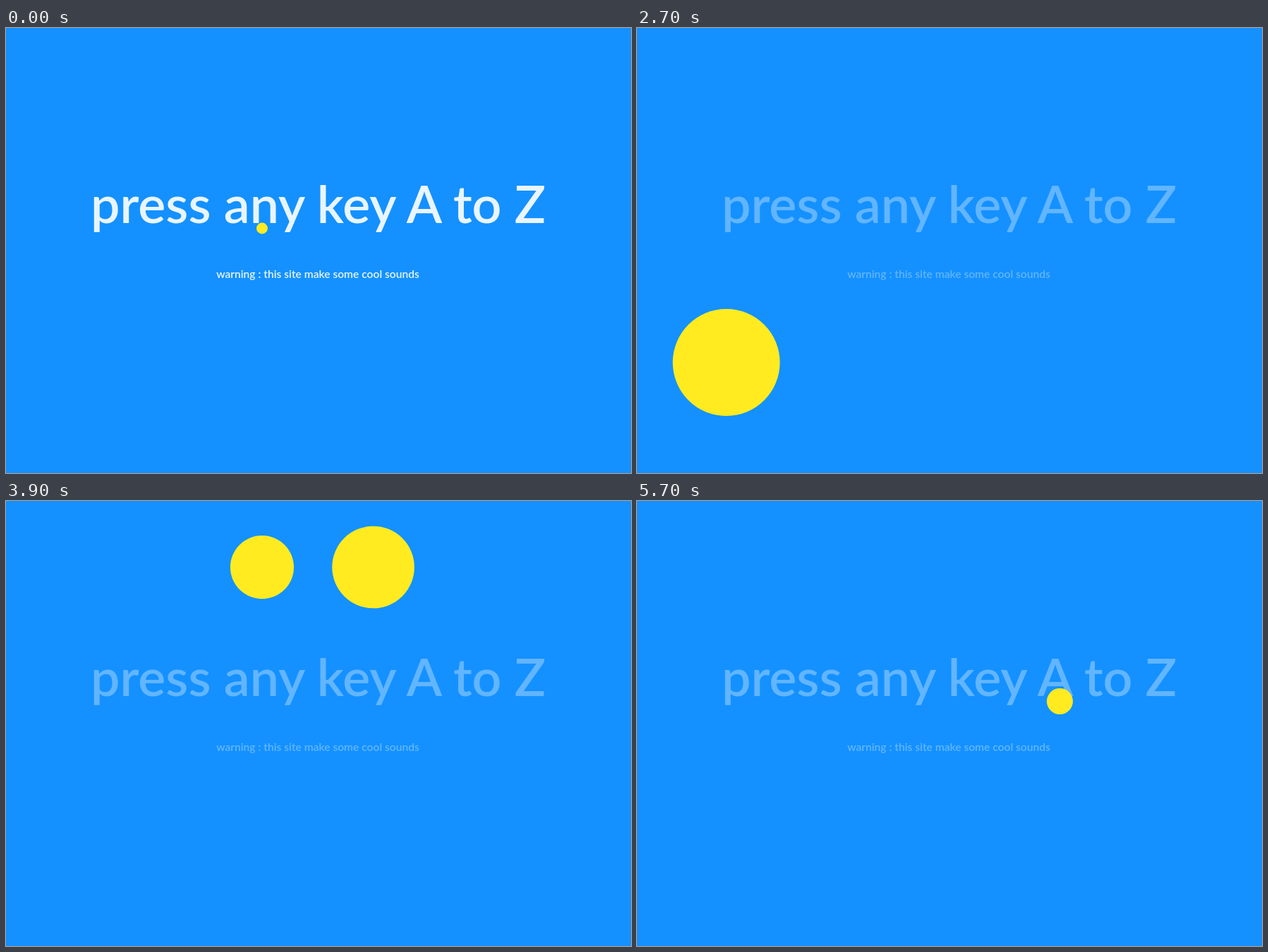
An HTML page that plays this animation: 886x632 px, repeating every 5800 ms.

```html
<!DOCTYPE html>
<html lang="en">
<head>
<meta charset="utf-8">
<title>press any key</title>
<style>
  html, body { margin: 0; width: 100%; height: 100%; overflow: hidden; background: #1491ff; }
  svg { display: block; width: 886px; height: 632px; }
  text { font-family: Lato, sans-serif; font-weight: 600; text-anchor: middle; fill: #fff; }
  circle { fill: #ffeb20; }
</style>
</head>
<body>
<svg viewBox="0 0 886 632">
  <g id="words">
    <text x="442.6" y="276.7" font-size="73.5">press any key A to Z</text>
    <text x="442" y="354.5" font-size="15.6">warning : this site make some cool sounds</text>
  </g>
  <g id="dots"></g>
</svg>
<script>
const LOOP = 5800, STEP = 100, LIFE = 510, MAX_RADIUS = 76;
const ROWS = ["QWERTYUIOP", "ASDFGHJKL", "ZXCVBNM"];

// Key and the moment it is pressed, in ms
const PRESSES = [
  ["G", -17], ["J", 690], ["V", 1570], ["B", 1958], ["L", 2180], ["X", 2450],
  ["J", 2710], ["L", 2710], ["E", 2800], ["P", 2800], ["R", 3018], ["O", 3097],
  ["T", 3493], ["U", 3758], ["V", 3985], ["L", 4480], ["M", 4593], ["H", 4671],
  ["G", 4845], ["F", 5080], ["K", 5230]
];

const words = document.getElementById("words");
const layer = document.getElementById("dots");

const dots = PRESSES.map(([key, start]) => {
  const row = ROWS.findIndex(keys => keys.includes(key));
  const dot = document.createElementNS("http://www.w3.org/2000/svg", "circle");
  dot.setAttribute("cx", 47.8 + 78.8 * ROWS[row].indexOf(key));
  dot.setAttribute("cy", 94 + 190.5 * row);
  layer.append(dot);
  return { dot, start };
});

// Each dot swells and shrinks along half a sine wave
function radius(age) {
  return age > 0 && age < LIFE ? MAX_RADIUS * Math.sin(Math.PI * age / LIFE) : 0;
}

function draw(now) {
  const time = Math.floor(now % LOOP / STEP) * STEP;
  words.setAttribute("opacity", Math.max(0.33, 0.91 - 0.00052 * time));
  for (const { dot, start } of dots) dot.setAttribute("r", radius(time - start));
  requestAnimationFrame(draw);
}

draw(0);
</script>
</body>
</html>
```
